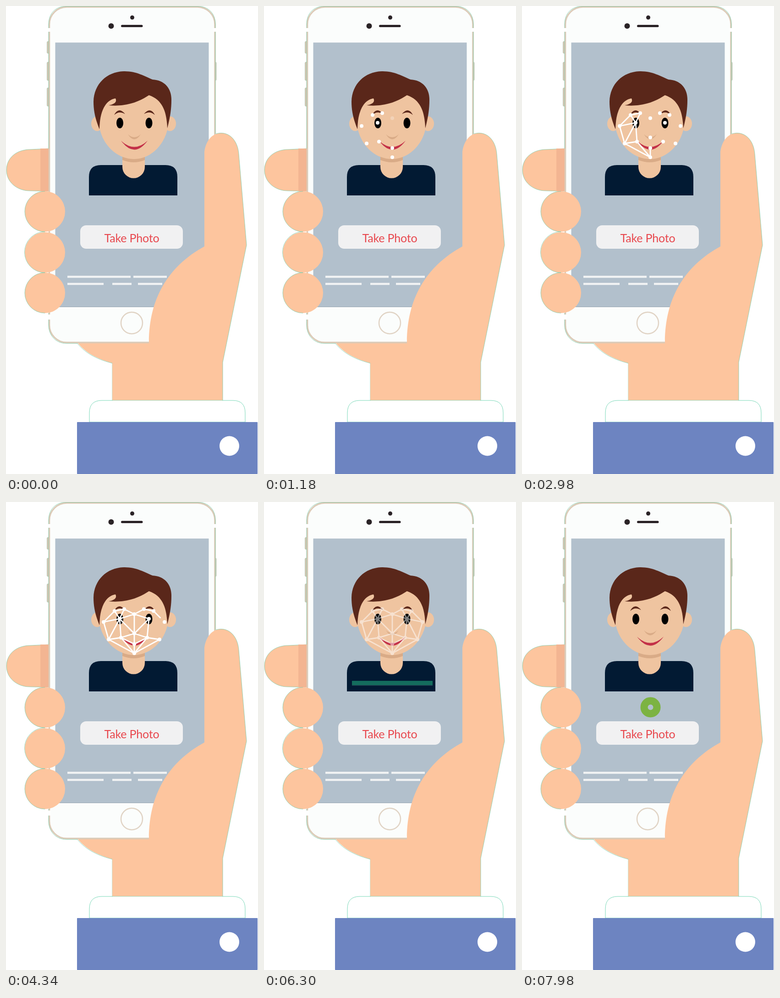
These frames come from a looping animation (550x1018 px, 8000 ms). An HTML page:

```html
<!DOCTYPE html>
<html lang="en">
<head>
<meta charset="utf-8">
<title>Face scan</title>
<style>
  html, body { margin: 0; width: 100%; height: 100%; overflow: hidden; background: #fff; }
  svg { display: block; width: 550px; height: 1018px; }
  .skin { fill: #fdc59e; }
  .face { fill: #efc4a0; }
  .shade { fill: #d9ab87; }
  .hair { fill: #5a271a; }
  .edge { fill: none; stroke: #71c9a6; stroke-width: 1; stroke-opacity: .75; }
  .rim { fill: #d8c6b2; stroke: #9cbfa8; stroke-width: .7; }
  .label { font: 25px Lato, "Open Sans", sans-serif; letter-spacing: -.2px; fill: #e8474d; text-anchor: middle; }
</style>
</head>
<body>
<svg viewBox="0 0 550 1018">
  <!-- hand behind the phone -->
  <path class="skin" d="M155 731C175 757 204 769 232 777V859H330V700H155Z"/>
  <path class="edge" d="M155 733C175 758 204 770 232 777V859"/>
  <path class="skin" d="M98 310L54 312C22 312 1 331 1 357C1 383 24 402 52 402L98 403Z"/>
  <path class="edge" d="M95 310L54 312C22 312 1 331 1 357C1 383 24 402 52 402L95 403"/>
  <path fill="#f3b592" d="M75 310H97V403H75Z"/>

  <!-- phone -->
  <g class="rim">
    <rect x="89.500" y="77" width="6" height="26" rx="2"/>
    <rect x="89.500" y="122" width="6" height="40" rx="2"/>
    <rect x="89.500" y="178" width="6" height="40" rx="2"/>
    <rect x="454" y="122" width="5" height="40" rx="2"/>
  </g>
  <rect x="94.500" y="2" width="361.500" height="730" rx="38" fill="#fbfdfc" stroke="#dccbb8" stroke-width="3.500"/>
  <path class="edge" d="M93 310V40C93 16 108 .5 132 .5H418C442 .5 457 16 457 40V278M93 668V694C93 716 108 734 132 734H156"/>
  <path fill="#fff" d="M91 48h6v8h-6zM453 48h6v8h-6zM91 671h6v11h-6z"/>
  <g fill="#2a2326">
    <circle cx="229.500" cy="43.500" r="6"/>
    <circle cx="275.500" cy="25" r="4.500"/>
    <rect x="251" y="41" width="47.500" height="5" rx="2.500"/>
  </g>
  <rect x="107.500" y="79.500" width="335" height="575" fill="#b2c0cc"/>
  <path d="M107 654.500H330" stroke="#9aa8b2"/>
  <circle cx="274.500" cy="689.500" r="23.500" fill="none" stroke="#e0d3c4" stroke-width="2.500"/>

  <!-- portrait -->
  <path fill="#021a33" d="M181 412V372Q181 346 207 346H348Q374 346 374 372V412Z"/>
  <path class="face" d="M254 320H303V350A24.500 24.500 0 0 1 254 350Z"/>
  <path class="shade" d="M254 327H303V335Q279 345 254 335Z"/>
  <ellipse class="face" cx="199" cy="256" rx="13" ry="16"/>
  <ellipse class="face" cx="358" cy="256" rx="13" ry="16"/>
  <path class="face" d="M203 190V255C206 298 240 333 279 333C318 333 350 298 354 258V190Z"/>
  <path class="hair" d="M204 268C195 246 191 228 191 208C192 168 222 142 259 142C285 142 303 153 320 160C346 161 362 180 361 205C361 228 357 247 352 266C351 236 345 205 312 194C294 206 265 220 224 216C236 214 243 209 239 201C224 203 205 218 204 268Z"/>
  <path class="hair" d="M236 237Q246 218 260 235Q247 227 236 237ZM301 235Q315 218 325 237Q314 227 301 235Z"/>
  <ellipse cx="248.500" cy="254.500" rx="7.500" ry="11.500"/>
  <ellipse cx="312" cy="254.500" rx="7.500" ry="11.500"/>
  <path class="shade" d="M266 279Q280 301 294 279Q280 292 266 279Z"/>
  <path fill="#c33148" d="M251 293Q280 332 309 293Q280 320 251 293Z"/>

  <!-- scan overlay -->
  <g id="scan">
    <g id="mesh" stroke="#fff" stroke-width="2.800" stroke-linecap="round"></g>
    <g id="dots" fill="#fff"></g>
    <rect id="track" x="192" y="390" width="176" height="10" fill="#fff" fill-opacity=".2"/>
    <rect id="fill" x="192" y="389" width="0" height="9.500" fill="#27c088"/>
  </g>
  <path id="ring" pathLength="100" fill="none" stroke="#7cb342"/>

  <rect x="162" y="477" width="224" height="51" rx="13" fill="#f1f1f2"/>
  <text class="label" x="274.500" y="514">Take Photo</text>
  <path d="M134 589H272M278 589H351M134 604.500H213M232 604.500H274M288 604.500H341" stroke="#f1f3f4" stroke-width="4.500"/>

  <!-- hand in front -->
  <g class="skin">
    <circle cx="85" cy="447" r="44"/>
    <circle cx="85" cy="536" r="44"/>
    <circle cx="85" cy="624" r="44"/>
    <path d="M433 317C436 295 448 277 470 276C492 277 506 296 508 322L525 520L473 775V859H232V735H312C311 640 352 567 433 523Z"/>
  </g>
  <path class="edge" d="M85 403A44 44 0 0 0 85 491A44 44 0 0 0 85 580A44 44 0 0 0 85 668M458 278C486 270 506 292 508 322L525 520L473 775V859"/>

  <!-- sleeve -->
  <path d="M182 905V885Q182 858 209 858H495Q522 858 522 885V905Z" fill="#fff" stroke="#79d8b8"/>
  <path d="M233 859H472" stroke="#fff"/>
  <rect x="155" y="905" width="394" height="113" rx="1" fill="#6d84c1"/>
  <circle cx="487.500" cy="957" r="21.500" fill="#fff"/>
</svg>

<script>
const LOOP = 8000;
const $ = id => document.getElementById(id);

// Landmarks in order of appearance
const pts = [
  [213, 261], [224, 299], [251, 295], [248, 254], [237, 237], [258, 233],
  [280, 329], [280, 309], [280, 244], [280, 286],
  [301, 233], [312, 254], [308, 295], [322, 237], [335, 299], [346, 261]
];

// Mesh edges in drawing order, one letter per landmark (a = first)
const edges = ('ae ef ad ab ed fd bd dc bc bg cg gh hc cj jh jd di if ij ik il ' +
  'jl jm mh mg ml mo og kn np pl po ol nl kl').split(' ')
  .map(e => [...e].map(c => pts[c.charCodeAt(0) - 97]));

function add(parent, tag, attrs) {
  const el = document.createElementNS('http://www.w3.org/2000/svg', tag);
  set(el, attrs);
  return parent.appendChild(el);
}
function set(el, attrs) {
  for (const k in attrs) el.setAttribute(k, attrs[k]);
}
const span = (t, from, length) => Math.min(1, Math.max(0, (t - from) / length));
const easeInOut = u => u < .5 ? 2 * u * u : 1 - 2 * (1 - u) ** 2;

const dots = pts.map(([cx, cy]) => add($('dots'), 'circle', { cx, cy, r: 4 }));
const lines = edges.map(([[x1, y1]]) => add($('mesh'), 'line', { x1, y1, x2: x1, y2: y1 }));

function draw(t) {
  dots.forEach((dot, i) => set(dot, { opacity: span(t, 350 + 100 * i, 120) }));

  lines.forEach((line, i) => {
    const u = span(t, 2052 + 77.3 * i, 77.3);
    const [[x1, y1], [x2, y2]] = edges[i];
    set(line, { x2: x1 + (x2 - x1) * u, y2: y1 + (y2 - y1) * u, opacity: u > 0 ? 1 : 0 });
  });

  const p = span(t, 4760, 1130);
  set($('track'), { opacity: span(t, 4700, 100) });
  set($('fill'), { width: 176 * p * (.6 + .4 * p) });
  set($('scan'), { opacity: 1 - span(t, 6050, 500) });

  // The ring is swept first, then thickens inward
  const sweep = easeInOut(span(t, 6680, 860));
  const w = 4 + 12 * span(t, 7500, 480);
  const r = 22 - w / 2;
  set($('ring'), {
    d: `M${280.5 + r} 446.5a${r} ${r} 0 1 1 ${-2 * r} 0a${r} ${r} 0 1 1 ${2 * r} 0`,
    'stroke-width': w,
    'stroke-dasharray': sweep < 1 ? `${100 * sweep} 200` : 'none',
    opacity: sweep > 0 ? 1 : 0
  });
}

const start = performance.now();
function tick() {
  draw((performance.now() - start) % LOOP);
  requestAnimationFrame(tick);
}
tick();
</script>
</body>
</html>
```
